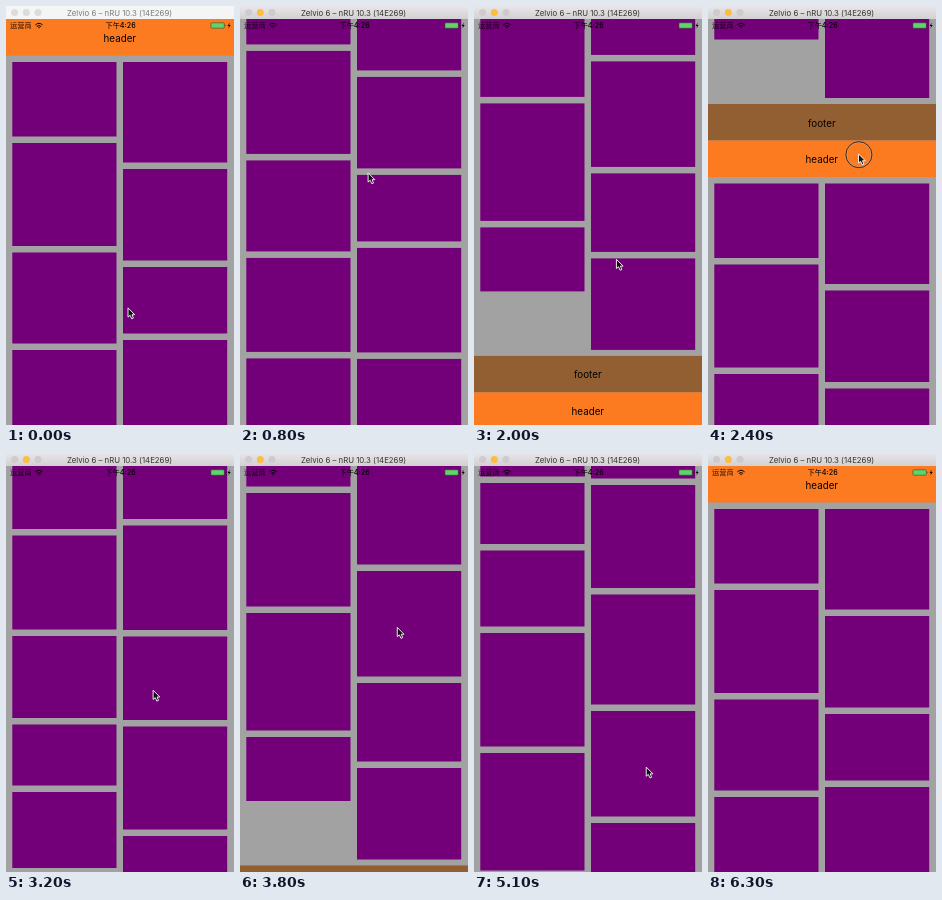
An HTML page for the animation above (6.4 s loop, 228 by 419 pixels).

```html
<!DOCTYPE html>
<html lang="zh">
<head>
<meta charset="utf-8">
<title>Waterfall list</title>
<style>
  html, body { margin: 0; width: 100%; height: 100%; overflow: hidden; background: #a2a2a2; }
  svg { display: block; width: 228px; height: 419px; }
  text { font-family: Inter, "Noto Sans CJK SC", "Noto Sans CJK", sans-serif; }
  .title { font-size: 7.8px; fill: #7b7b7b; }
  .label { font-size: 9.8px; }
  .status { font-size: 7.2px; }
  .bar { fill: #f5f5f5; }
  .light { fill: #dcdcdc; }
  .active .title { fill: #333; }
  .active .bar { fill: url(#chrome); }
  .active .light { fill: #cdcbcd; }
  .active .min { fill: #fcbe3e; }
</style>
</head>
<body>
<svg id="stage" viewBox="0 0 228 419">
  <defs>
    <linearGradient id="chrome" x2="0" y2="1">
      <stop stop-color="#e8e6e8"/>
      <stop offset="1" stop-color="#d2d0d2"/>
    </linearGradient>
  </defs>
  <rect width="228" height="419" fill="#a2a2a2"/>
  <g id="list"></g>

  <g id="statusBar">
    <text class="status" x="4" y="22.3" fill-opacity=".85">运营商</text>
    <g fill="none" stroke="#000">
      <path d="M29.4 18.9Q33 15.7 36.6 18.9M30.8 20.5Q33 18.6 35.2 20.5"/>
      <path d="M31.9 21.3h2.2L33 22.5Z" fill="#000" stroke="none"/>
    </g>
    <text class="status" x="114.6" y="22.3" text-anchor="middle" font-weight="500">下午4:26</text>
    <rect x="204.9" y="16.8" width="13.4" height="5.4" rx="1" fill="#62d36c" stroke="#1c3d1f" stroke-width=".5"/>
    <path d="M218.9 18.5q1 1 0 2Z"/>
    <path d="M223.8 16.6l-2.2 3.4h1.4l-.7 2.5 2.4-3.4h-1.5Z"/>
  </g>

  <g id="titleBar">
    <rect class="bar" width="228" height="13"/>
    <circle class="light" cx="8.6" cy="6.5" r="3.5"/>
    <circle class="light min" cx="20.3" cy="6.5" r="3.5"/>
    <circle class="light" cx="32" cy="6.5" r="3.5"/>
    <text class="title" x="113.5" y="9.5" text-anchor="middle">Zelvio 6 – nRU 10.3 (14E269)</text>
  </g>

  <g id="pointer">
    <g id="ring" fill="none">
      <circle cx=".6" cy="1.2" r="12.2" stroke="#bbb" stroke-opacity=".5"/>
      <circle cx=".6" cy="1.2" r="13" stroke="#222" stroke-width=".9"/>
    </g>
    <path d="M.2 .4V9.6L2.3 7.8 3.9 11.3 5.6 10.6 4.2 7.2H6.9Z" fill="#111" stroke="#fff" stroke-width=".9" stroke-linejoin="round"/>
  </g>
</svg>
<script>
const LOOP = 6400, STEP = 100, WAKE = 400, DRAG = 300;
const TOP = 13, GAP = 6.5, BAND = 36.5, CELL = 104.2, COLUMNS = [6.3, 117];
const HEIGHTS = [
  74.5, 100.5, 103, 91.5, 91, 66.5, 104.5, 94, 82, 83.5,
  61, 103, 76, 110, 113.5, 105.5, 117.5, 78.5, 64, 91.5
];

// Scroll offset at a few moments, joined by a smooth curve
const SCROLL = [
  [300, 0], [1400, 344], [2400, 957.5], [3200, 1340.5], [3800, 1722],
  [4300, 1783], [4700, 1751], [5100, 1582], [6300, 0]
];

const STROKES = [
  { at: 400, from: [121.8, 301.5], to: [128, 160] },
  { at: 1400, from: [126.2, 276.5], to: [138, 150] },
  { at: 2100, from: [143, 272], to: [150.3, 147.5] },
  { at: 3300, from: [146.8, 240], to: [156.8, 173.5] },
  { at: 4700, from: [160, 180], to: [172.5, 328] },
  { at: 5500, from: [168, 190], to: [178, 440] }
];
const PATH = STROKES.flatMap(({ at, from, to }) => [[at, ...from], [at + DRAG, ...to]]);

const $ = id => document.getElementById(id);
const stage = $("stage"), list = $("list"), pointer = $("pointer"), ring = $("ring");

function add(tag, attrs, text = "") {
  const el = document.createElementNS(stage.namespaceURI, tag);
  for (const key in attrs) el.setAttribute(key, attrs[key]);
  el.textContent = text;
  list.append(el);
}

function addBand(y, fill, label) {
  add("rect", { x: 0, y, width: 228, height: BAND, fill });
  add("text", { x: 113.8, y: y + 22.5, class: "label", "text-anchor": "middle" }, label);
}

// Each cell goes into the shorter column; returns the bottom of the section
function addSection(top) {
  addBand(top, "#fc7b21", "header");
  const ends = COLUMNS.map(() => top + BAND + GAP);
  for (const height of HEIGHTS) {
    const c = ends[0] <= ends[1] ? 0 : 1;
    add("rect", { x: COLUMNS[c], y: ends[c], width: CELL, height, fill: "#730078" });
    ends[c] += height + GAP;
  }
  const bottom = Math.max(...ends) - 0.5;
  addBand(bottom, "#925f33", "footer");
  return bottom + BAND;
}

function locate(keys, t) {
  const time = Math.min(Math.max(t, keys[0][0]), keys[keys.length - 1][0]);
  const i = Math.max(1, keys.findIndex(key => key[0] >= time));
  const span = keys[i][0] - keys[i - 1][0];
  return { i, span, p: (time - keys[i - 1][0]) / span };
}

const smooth = p => p * p * (3 - 2 * p);

function slope(keys, i) {
  const a = keys[i - 1], b = keys[i + 1];
  return a && b ? (b[1] - a[1]) / (b[0] - a[0]) : 0;
}

function scrollAt(t) {
  const { i, span, p } = locate(SCROLL, t);
  const a = SCROLL[i - 1][1], b = SCROLL[i][1], q = 1 - p;
  const bend = slope(SCROLL, i - 1) * q - slope(SCROLL, i) * p;
  return a + (b - a) * smooth(p) + span * p * q * bend;
}

function pointerAt(t) {
  const { i, p } = locate(PATH, t);
  const [, ...a] = PATH[i - 1], [, ...b] = PATH[i];
  return a.map((v, n) => v + (b[n] - v) * smooth(p));
}

function draw() {
  const t = Math.floor(performance.now() % LOOP / STEP) * STEP;
  const pressed = STROKES.some(({ at }) => t >= at && t <= at + DRAG);
  list.setAttribute("transform", `translate(0 ${-scrollAt(t)})`);
  pointer.setAttribute("transform", `translate(${pointerAt(t)})`);
  ring.setAttribute("visibility", pressed ? "visible" : "hidden");
  stage.classList.toggle("active", t >= WAKE);
  requestAnimationFrame(draw);
}

addSection(addSection(TOP));
draw();
</script>
</body>
</html>
```
